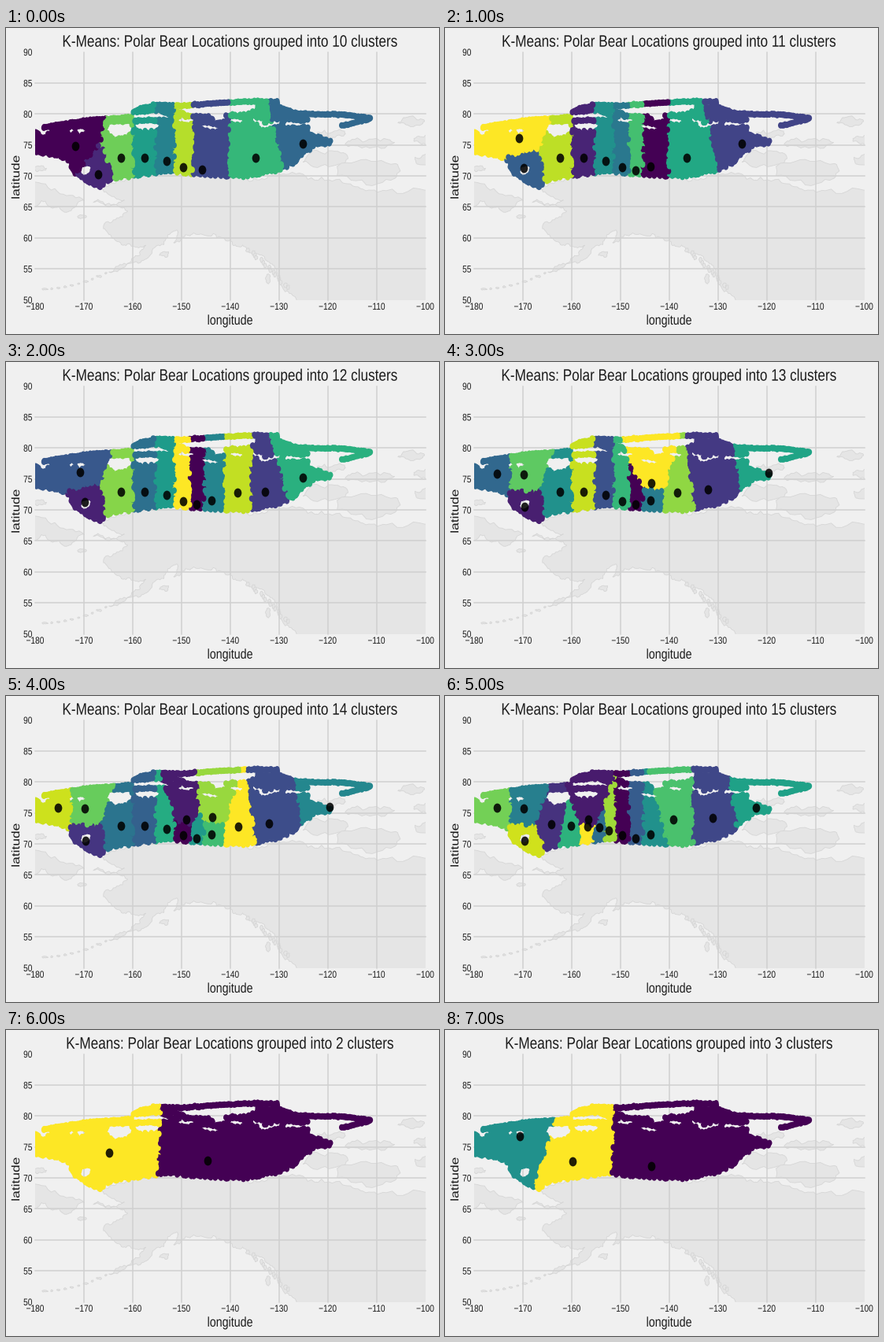
A matplotlib script that plays this animation: 550 px wide and 389 px high, repeating every 8000 ms.

```python
import numpy as np
import matplotlib.pyplot as plt
from matplotlib.animation import FuncAnimation
from matplotlib.patches import PathPatch, Polygon, Rectangle
from matplotlib.path import Path
from matplotlib.textpath import TextPath
from matplotlib.transforms import Affine2D

W, H = 550, 389
LEFT, RIGHT, TOP, BOTTOM = 37, 532.5, 30.5, 345.5
SCALE = np.array([(RIGHT - LEFT) / 80, (BOTTOM - TOP) / 40])  # pixels per degree
SQUASH = 0.82  # the whole chart is narrowed by this factor
PAPER, LAND, COAST, GRID, INK = "#f0f0f0", "#e5e5e5", "#d6d6d6", "#d0d0d0", "#1c1c1c"
rng = np.random.default_rng(7)

# Key points of the coast in (lon, lat); rough() adds the detail
AMERICA = [(-90, 68), (-108, 67.6), (-117, 68.9), (-128, 70.3), (-136, 69.1), (-156.6, 71.3),
           (-166.5, 68.6), (-161.7, 66.1), (-168.1, 65.7), (-161, 64.3), (-166, 61.5),
           (-162, 58.8), (-157.3, 58.8), (-158.5, 57.2), (-164.9, 54.5), (-158.4, 56),
           (-153.6, 58.9), (-150.8, 61.2), (-151.6, 59.2), (-147.5, 60.8), (-140, 59.6),
           (-136.6, 58.2), (-133.5, 57.2), (-130.5, 54.5), (-127.5, 51), (-123, 45), (-90, 45)]
SIBERIA = [(-184, 69.5), (-180, 69), (-174.9, 67.1), (-169.9, 66), (-172.6, 64.4),
           (-176, 64.9), (-178.7, 66), (-184, 64.5)]
# Islands: lon, lat, half width, half height
ISLANDS = [(-120.5, 72.8, 4.5, 1.5), (-111, 70.8, 7, 2), (-111.5, 75.4, 5, .7),
           (-119, 76.8, 3, .6), (-102.5, 78.8, 3, .6), (-100, 75.8, 2.4, .7),
           (-99.5, 72.7, 3, 1), (-179.2, 71.2, 1.5, .4), (-170.4, 63.4, 1.2, .3),
           (-153.5, 57.4, 1, .5), (-132.2, 53.3, .5, .9)]

# Area covered by the sightings, in pixels
FIELD = [(37, 131), (48, 125), (120, 120), (200, 118), (225, 111), (308, 109), (320, 98),
         (345, 99), (348, 107), (384, 112), (384, 134), (412, 142), (415, 147), (393, 149),
         (362, 175), (344, 182), (300, 190), (260, 188), (205, 183), (160, 189), (127, 195),
         (121, 203), (112, 200), (88, 186), (77, 166), (37, 159)]
GAPS = [(144, 128, 14, 8), (180, 124, 15, 3), (101, 180, 5, 4)]
TRACKS = [[(48, 126), (100, 118), (160, 113)], [(125, 119), (200, 117)],
          [(162, 107), (172, 102), (190, 98), (222, 99), (275, 95), (316, 93)],
          [(166, 106), (215, 103)], [(195, 104), (215, 114)], [(200, 100), (230, 111)],
          [(316, 93), (344, 94), (346, 101), (372, 109), (430, 110), (463, 115), (427, 124)]]

# Cluster sites in pixels. Sites on ROW share one latitude, so their borders are upright.
ROW = 170
MIDDLE = [146, 176, 204, 224.5, 242, 261]
PAIR = [(94, 140), (100, 178)]
TRIO = [(66, 142), (100, 143), (101, 184)]
EAST = [(377, 147)]


def row(*xs):
    return [(x, ROW) for x in xs]


FOURTEEN = TRIO + row(*MIDDLE, 295) + [(334, 162), (411, 141), (262, 154), (229, 157)]
# Cluster count, sites and the colour label of each site
STEPS = [
    (10, [(88, 150), (117, 186)] + row(*MIDDLE[:4], 249, 317) + EAST, [0, 1, 7, 5, 4, 8, 2, 6, 3]),
    (11, PAIR + row(*MIDDLE, 307) + EAST, [10, 3, 9, 1, 5, 4, 7, 0, 6, 2]),
    (12, PAIR + row(*MIDDLE, 294, 329) + EAST, [3, 1, 9, 4, 6, 11, 0, 5, 10, 2, 7]),
    (13, FOURTEEN[:-1], [(5 * n + 4) % 13 for n in range(13)]),
    (14, FOURTEEN, [12, 10, 2, 5, 4, 8, 0, 7, 9, 13, 3, 6, 11, 1]),
    (15, TRIO + [(135, 163)] + row(160, 181, 196, 208, *MIDDLE[3:])
     + [(290, 157), (340, 155), (395, 142), (182, 157)],
     [11, 6, 13, 2, 9, 14, 5, 12, 0, 4, 7, 10, 3, 8, 1]),
    (2, [(131, 156), (256, 166)], [1, 0]),
    (3, [(95, 134.5), (162, 166.5), (262, 173)], [1, 2, 0]),
]


def to_px(lonlat):
    return (np.asarray(lonlat, float) - (-180, 90)) * SCALE * (1, -1) + (LEFT, TOP)


def rough(points, depth):
    """Break each edge at a shifted midpoint for a ragged coast."""
    pts = np.asarray(points, float)
    for _ in range(depth):
        step = np.roll(pts, -1, 0) - pts
        bend = np.clip(step[:, ::-1], -2, 2) * (-1, 1) * rng.uniform(-.25, .25, (len(pts), 1))
        pts = np.stack([pts, pts + step / 2 + bend], 1).reshape(-1, 2)
    return pts


def island(lon, lat, w, h):
    a = np.linspace(0, 2 * np.pi, 9, endpoint=False)
    r = rng.uniform(.7, 1.15, 9)
    return rough(np.c_[lon + w * r * np.cos(a), lat + h * r * np.sin(a)], 2)


def shores():
    yield rough(AMERICA, 4)
    yield rough(SIBERIA, 3)
    for spot in ISLANDS:
        yield island(*spot)
    for lon in np.linspace(-178, -165.5, 10):  # island arc in the south-west
        yield island(lon, 51.7 + 2.8 * ((lon + 179) / 14) ** 2, rng.uniform(.2, .6), .15)
    for t in np.linspace(0, 1, 16):  # broken coast in the south-east
        yield island(-136.2 + 8 * t + rng.uniform(-.5, .5), 58 - 6 * t, .35, .4)


def sightings():
    """Dot centres: a jittered grid over the field plus the thin tracks."""
    grid = np.mgrid[37:420:2.7, 92:206:2.9].reshape(2, -1).T
    dots = grid + rng.uniform(-1.3, 1.3, grid.shape)
    keep = Path(FIELD).contains_points(dots) & (dots[:, 0] >= LEFT)
    slits = rng.uniform((225, 112, 2, .2), (382, 129, 9, 1.2), (13, 4))
    west = rng.uniform((45, 128, 2, .2), (120, 137, 7, 1), (4, 4))
    for x, y, w, h in [*GAPS, *slits, *west]:
        keep &= np.hypot((dots[:, 0] - x) / (w + 3), (dots[:, 1] - y) / (h + 3.5)) > 1
    parts = [dots[keep]]
    for track in TRACKS:
        for a, b in zip(track, track[1:]):
            t = np.linspace(0, 1, int(np.hypot(b[0] - a[0], b[1] - a[1]) / 1.8) + 2)[:, None]
            line = np.array(a) * (1 - t) + np.array(b) * t
            parts.append(line + rng.normal(0, .5, line.shape))
    return rng.permutation(np.concatenate(parts))


def marks(sites):
    """Black dots: those on the row hang along a curve that dips in the middle."""
    x, y = sites.T
    dip = 165 + 16 * np.exp(-((x - 242) / 33) ** 2)
    return np.c_[x, np.where(y == ROW, dip, y)]


def text_path(text, size, x, y, ha="center", turn=0, middle=False):
    """Text outline at (x, y); y is the baseline unless middle is set."""
    path = TextPath((0, 0), text, size=size, prop={"family": "Liberation Sans"})
    path = path.transformed(Affine2D().rotate_deg(turn).scale(SQUASH, -1))
    box = path.get_extents()
    dx = -box.x1 if ha == "right" else -(box.x0 + box.x1) / 2
    dy = -(box.y0 + box.y1) / 2 if middle else 0
    return path.transformed(Affine2D().translate(x + dx, y + dy))


def add_text(*args, **kw):
    return ax.add_patch(PathPatch(text_path(*args, **kw), fc=INK, lw=0, zorder=6))


def title_path(k):
    text = f"K-Means: Polar Bear Locations grouped into {k} clusters"
    return text_path(text, 20.95, (LEFT + RIGHT) / 2, 23.7)


def add_grid(x, y):
    ax.plot(x, y, color=GRID, lw=1.1, zorder=2)


fig = plt.figure(figsize=(W / 100, H / 100), dpi=100, facecolor=PAPER)
ax = fig.add_axes([0, 0, 1, 1])
ax.set(xlim=(0, W), ylim=(H, 0))
ax.axis("off")
frame = Rectangle((LEFT, TOP), RIGHT - LEFT, BOTTOM - TOP, transform=ax.transData)

for shore in shores():
    land = ax.add_patch(Polygon(to_px(shore), fc=LAND, ec=COAST, lw=.6, zorder=1))
    land.set_clip_path(frame)

for lon in range(-180, -99, 10):
    x = to_px((lon, 50))[0]
    if -180 < lon < -100:
        add_grid([x, x], [TOP, BOTTOM])
    add_text(f"\u2212{-lon}", 12.4, x, 353.8, middle=True)
for lat in range(50, 91, 5):
    y = to_px((-180, lat))[1]
    if 50 < lat < 90:
        add_grid([LEFT, RIGHT], [y, y])
    add_text(str(lat), 12.4, 33, y + .3, ha="right", middle=True)
add_text("longitude", 17.4, (LEFT + RIGHT) / 2, 377)
add_text("latitude", 17.4, 12, 189.5, turn=90, middle=True)
title = ax.add_patch(PathPatch(title_path(10), fc=INK, lw=0, zorder=6))

oval = Path.unit_circle().transformed(Affine2D().scale(SQUASH, 1))
dots = sightings()
cloud = ax.scatter(*dots.T, s=(8 * .72) ** 2, marker=oval, linewidths=0, zorder=3)
cloud.set_clip_path(frame)
centres = ax.scatter([], [], s=(11.8 * .72) ** 2, marker=oval, color="black",
                     alpha=.87, linewidths=0, zorder=4)


def draw(i):
    k, sites, labels = STEPS[i]
    sites = np.array(sites, float)
    gap = (dots[:, None] - sites) / SCALE
    label = np.array(labels)[(gap ** 2).sum(2).argmin(1)]
    cloud.set_facecolor(plt.cm.viridis(label / (k - 1)))
    centres.set_offsets(marks(sites))
    title.set_path(title_path(k))
    return cloud, centres, title


anim = FuncAnimation(fig, draw, frames=len(STEPS), interval=1000, repeat=True, repeat_delay=0)
plt.show()
```
